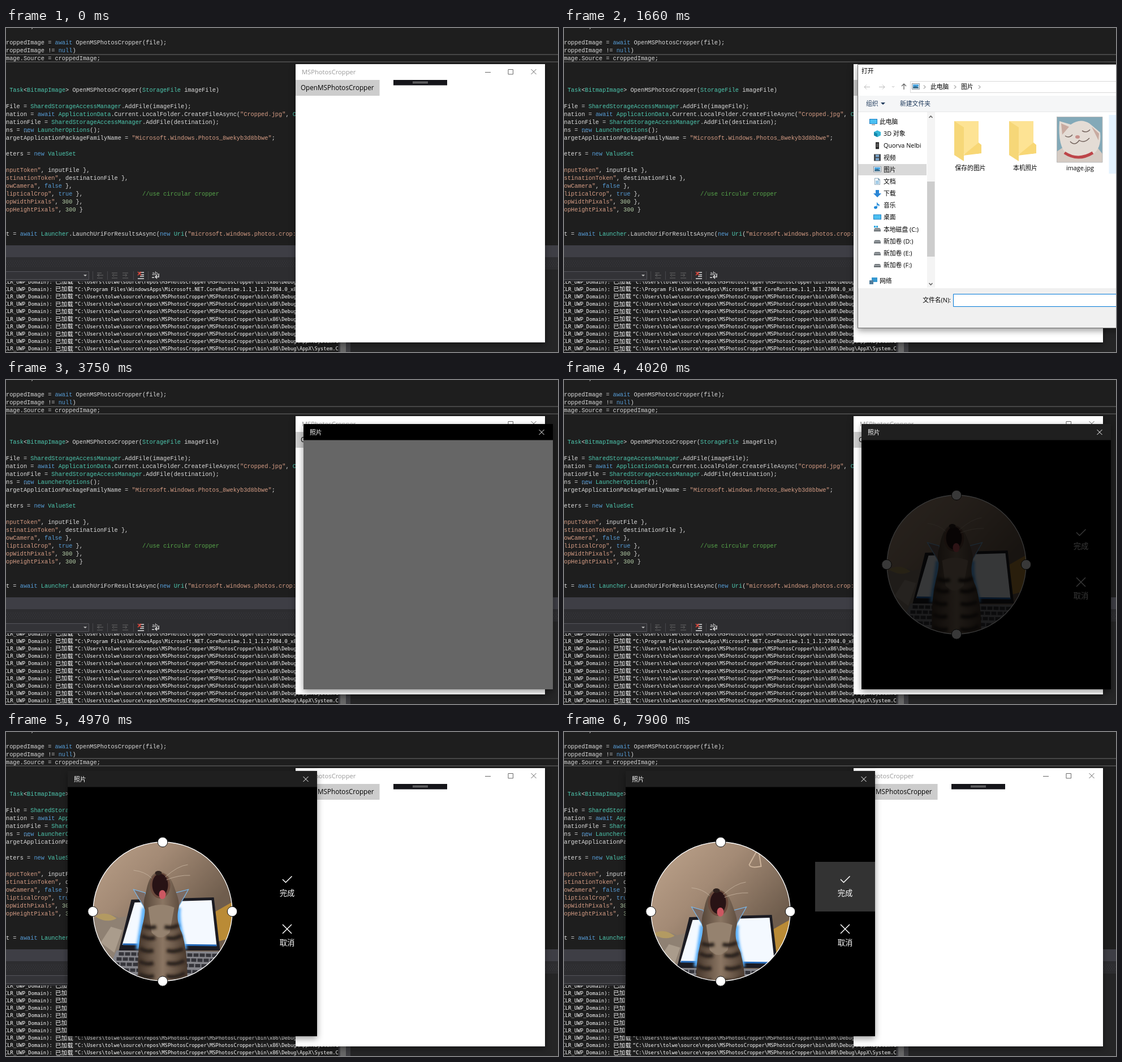
Write an HTML page that moves like this. It is 976x574 px and loops after 8000 ms.

```html
<!DOCTYPE html>
<html lang="zh-CN">
<head>
<meta charset="utf-8">
<style>
html, body { margin: 0; width: 100%; height: 100%; overflow: hidden; background: #1e1e1e; }
svg { display: block; }
text { font: 10.8px "Open Sans", "Noto Sans CJK SC", sans-serif; white-space: pre; }
.mono text { font: 10.3px "Liberation Mono", "Noto Sans CJK SC", monospace; }
.mono .log { font: 8.8px "DejaVu Sans Mono", "Noto Sans CJK SC", monospace; }
.mono .cjk { font-size: 10.6px; }
.mid { text-anchor: middle; }
.end { text-anchor: end; }
.line { fill: none; stroke: #666; }
.big { font-size: 13.3px; }
.shadow { filter: drop-shadow(0 4px 6px rgba(0,0,0,.4)); }
</style>
</head>
<body>
<svg id="stage" width="100%" height="100%" viewBox="0 0 976 574">
<defs>
  <linearGradient id="wall" x2=".8" y2="1">
    <stop offset="0" stop-color="#c0a68e"/><stop offset=".35" stop-color="#a38a75"/><stop offset=".7" stop-color="#6f5d4d"/>
  </linearGradient>
  <linearGradient id="fur">
    <stop offset="0" stop-color="#46372c"/><stop offset=".5" stop-color="#8b7663"/><stop offset="1" stop-color="#4a3a2e"/>
  </linearGradient>
  <filter id="blur" x="-20%" width="140%"><feGaussianBlur stdDeviation="2"/></filter>
  <clipPath id="round"><circle cx="168" cy="249" r="123"/></clipPath>
  <clipPath id="logClip"><path d="M0 449H588V574H0Z"/></clipPath>
  <symbol id="pic" viewBox="0 0 14 11"><path d="M.5.5h13v10H.5Z" fill="#fff" stroke="#7f8b96"/><path d="M2 2h10v4H2Z" fill="#4aa3df"/><path d="M2 6l5-1 5 2v2H2Z" fill="#356b8c"/></symbol>
  <symbol id="folder" viewBox="0 0 48 72"><path d="M0 0H43V58H0Z" fill="#fde394"/><path d="M43 38l5 4v15l-33 4Z" fill="#f8d775"/><path d="M0 0L17 11V71L0 60Z" fill="#f6d778"/></symbol>
  <symbol id="photo" viewBox="0 0 247 327" preserveAspectRatio="none">
    <path d="M0 0H247V327H0Z" fill="url(#wall)"/>
    <path d="M190 8V16L174 45Q176 52 195 48L190 16" class="line" style="stroke:#cdb49b" stroke-width="2"/>
    <path d="M0 172Q20 156 46 170L70 165 50 262H0Z" fill="#8f8173"/>
    <path d="M4 168q18-12 38 3q-16 10-38-3" fill="#b39a62"/>
    <path d="M14 214l18-28 20 6-14 40" fill="#aa9c8c"/>
    <path d="M212 162L247 142V205L222 212Z" fill="#ba8b36"/>
    <path d="M0 250L247 236V327H0Z" fill="#5a4231"/>
    <path d="M42 228L228 230 252 298 14 290Z" fill="#85858b"/>
    <path d="M46 234L228 237M42 243L232 246M38 252L236 256M33 262L240 267M28 273L244 279" class="line" style="stroke:#34343a" stroke-width="6" stroke-dasharray="9 2"/>
    <path d="M68 138L214 134 225 228 46 228Z" fill="#1b1b22"/>
    <path d="M74 143L210 139 219 220 52 218Z" fill="#f4f9ff"/>
    <path d="M53 217L219 219" stroke="#2469b8" stroke-width="3"/>
    <path d="M91 152Q88 178 80 226M152 152Q148 176 163 226" class="line" style="stroke:#5cb2ff" stroke-width="8" filter="url(#blur)"/>
    <path d="M92 154L72 120 93 126ZM150 154L169 120 146 126Z" fill="#7c6b63" stroke="#79b9ee" stroke-width="1.200"/>
    <path d="M116 88C105 90 98 104 95 120C91 136 88 146 92 156C92 168 88 182 85 196C80 222 78 260 82 308H166C169 262 166 222 157 196C150 180 148 168 152 152C154 140 148 128 144 116C138 98 128 88 116 88Z" fill="url(#fur)"/>
    <path d="M98 152Q120 142 144 152L136 196Q119 214 104 196Z" fill="#95826f"/>
    <g filter="url(#blur)">
      <path d="M90 184q10 6 22 2m15 0q12 4 25-3M86 202q14 8 24 3m20 0q14 5 27-4M83 224q12 8 24 4m24 0q14 4 29-3M82 247q14 8 25 3m24 0q15 5 31-4M82 270q14 7 26 3m22 0q15 5 33-5" class="line" style="stroke:#2c211b" stroke-width="7"/>
    </g>
    <ellipse cx="119" cy="113" rx="18" ry="23" fill="#6a4a3c"/>
    <ellipse cx="119" cy="112" rx="14" ry="20" fill="#281315"/>
    <ellipse cx="123" cy="129" rx="6" ry="8" fill="#cc5862"/>
    <ellipse cx="116" cy="91" rx="6" ry="4" fill="#2d201c"/>
    <path d="M128 98Q150 78 168 76M130 103Q152 94 172 95M104 100Q92 88 72 86" class="line" style="stroke:#c9b6a2" stroke-width=".8"/>
  </symbol>
  <symbol id="whiteCat" viewBox="0 0 81 81">
    <path d="M0 0H81V81H0Z" fill="#83a9b8"/>
    <path d="M0 81V62L18 50 70 52 81 66V81Z" fill="#d5cbc3"/>
    <path d="M5 8L25 14Q42 2 58 12L77 28Q80 58 62 68Q40 76 18 66Q2 54 5 8Z" fill="#e4dcd5"/>
    <path d="M8 12L22 18 10 32ZM62 18L75 30 74 42Z" fill="#c8aaa0"/>
    <path d="M14 64Q38 80 64 64" class="line" style="stroke:#bd4549" stroke-width="5"/>
    <path d="M15 34q7 5 13-2M45 25q8 5 14-2M24 44q8 9 16-2q9 6 18-4" class="line" style="stroke:#75655f" stroke-width="1.5"/>
    <ellipse cx="37" cy="36" rx="4" ry="3" fill="#c78f8a"/>
  </symbol>
</defs>

<!-- editor -->
<g class="mono">
  <path d="M0 0H976V574H0Z" fill="#1e1e1e"/>
  <path d="M0 47H976M0 60H976" stroke="#464646" stroke-width="2"/>
  <g id="code"></g>
  <path d="M32 184h11" stroke="#aaa" stroke-dasharray="2 2"/>
  <path d="M0 385H976V450H0Z" fill="#2d2d30"/>
  <path d="M0 385H976V406H0Z" fill="#3e3e45"/>
  <path d="M0 413H976M0 419H976" stroke="#414147" stroke-dasharray="1 3"/>
  <path d="M2 416H976M2 422H976" stroke="#414147" stroke-dasharray="1 3"/>
  <path d="M-1 431.500H146.500V445.500H-1Z" fill="#333337" stroke="#55555a"/>
  <path d="M137 437h6l-3 3Z" fill="#bbb"/>
  <path d="M153.500 431v15M179.500 431v15M225.500 431v15M251.500 431v15" stroke="#46464a"/>
  <path d="M161 434h8m-6 4h9m-11 5h10m-6-7l-4 2 4 2M187 434h10m-6 4h6m-10 5h10m-6-7l-3 2 3 2M206 434h10m-10 4h6m-6 5h10m-5-7l3 2-3 2" class="line"/>
  <path d="M236 433h8m-5 4h5m-7 3h7m-11 4h11" stroke="#ddd" stroke-width="1.5"/>
  <path d="M233 432l6 6m0-6l-6 6" stroke="#e0453a" stroke-width="1.700"/>
  <text x="258" y="438" fill="#ddd" class="log">ab</text>
  <path d="M258 442h4m8-7v6h-6m3-3l-3 3 3 3" class="line" style="stroke:#ddd" stroke-width="1.500"/>
  <g id="log" clip-path="url(#logClip)" fill="#fff"></g>
  <path d="M588 450H609V574H588Z" fill="#3e3e42"/><path d="M591 450H601V574H591Z" fill="#686868"/>
  <path d="M609 428H976V574H609Z" fill="#252526"/>
</g>

<!-- app window -->
<g>
  <path class="shadow" d="M512 64H953V557H512Z" fill="#fff"/>
  <text id="appTitle" x="523" y="81.500" style="font-size:11.2px">MSPhotosCropper</text>
  <path d="M847 78.500h10M888 73.500h8.500v8.500h-8.500ZM928.500 73l9 9m0-9l-9 9" class="line"/>
  <rect id="btn" x="513" y="93" width="146.500" height="26" stroke-width="2"/>
  <text x="521" y="110" style="font-size:11.7px">OpenMSPhotosCropper</text>
  <path d="M685 92H780V101.500H685Z" fill="#15151a"/>
  <path d="M719 95.500h27m-27 2h27" stroke="#999"/>
</g>

<!-- file dialog -->
<g id="dialog">
  <path class="shadow" d="M.5.5H831.500V467.500H.5Z" fill="#fff" stroke="#6b6b6b"/>
  <text x="7" y="16">打开</text>
  <path d="M814 7l9 9m0-9l-9 9" class="line" style="stroke:#111"/>
  <path d="M22 40.500h-10m4-4l-4 4 4 4M38 40.500h10m-4-4l4 4-4 4M61 39l2 2 2-2" class="line" style="stroke:#bbb"/>
  <path d="M82 45v-10m-4 4l4-4 4 4" class="line" stroke-width="1.300"/>
  <path d="M93.500 30.500h540v20h-540ZM614.500 30.500v20M643.500 30.500h178v20h-178Z" class="line" style="stroke:#d9d9d9"/>
  <path d="M602 39l4 4 4-4M627 38a4 4 0 1 0 0 4m0-7v3h-3" class="line" stroke-width="1.300"/>
  <circle cx="810" cy="38.500" r="3.200" class="line"/><path d="M808 41l-4 4" class="line" stroke-width="1.500"/>
  <text x="652" y="44" fill="#6d6d6d">搜索"图片"</text>
  <path d="M1 56H831V84H1Z" fill="#f5f6f7"/><path d="M1 84.500H831" stroke="#e6e7e8"/>
  <g fill="#1e395b"><text x="15" y="74">组织</text><text x="75" y="74">新建文件夹</text><path d="M41 68h8l-4 4ZM747 68h7l-3.500 4Z"/></g>
  <use href="#pic" x="725" y="65" width="13" height="10"/>
  <path d="M773.500 65.500h13v9.500h-13Z" fill="#fff" stroke="#2c6ba0"/><path d="M781 66h5v9h-5Z" fill="#6fb2e4"/>
  <circle cx="811.500" cy="70" r="7" fill="#0a64ad"/><text x="811.500" y="74" class="mid" fill="#fff" font-weight="700">?</text>
  <g id="content">
    <use href="#pic" x="96" y="34" width="14" height="11"/>
    <path d="M117 37.500l3 3-3 3M171 37.500l3 3-3 3M214 37.500l3 3-3 3" class="line"/>
    <text x="129" y="44">此电脑</text><text x="183" y="44">图片</text>
    <path d="M1 177H122V197H1Z" fill="#d9d9d9"/>
    <g id="side"></g>
    <path d="M123 85H137V396H123Z" fill="#f4f4f4"/><path d="M123 208H136.500V341H123Z" fill="#cdcdcd"/>
    <path d="M126.500 95l3-3 3 3M126.500 388l3 3 3-3" class="line" stroke-width="1.600"/>
    <g id="files">
      <rect id="hover" y="90" width="92.500" height="104"/>
      <use href="#folder" x="171" y="101" width="48" height="72"/>
      <use href="#folder" x="268" y="101" width="48" height="72"/>
      <use href="#whiteCat" x="352" y="93" width="81" height="81"/>
      <use href="#photo" x="458.500" y="93.500" width="60" height="80"/>
      <path d="M352.500 93.500h80.500v80.500h-80.500ZM458.500 93.500h60v80.500h-60Z" class="line" style="stroke:#bbb"/>
      <g class="mid"><text x="199.500" y="188">保存的图片</text><text x="296.500" y="188">本机照片</text><text x="393.500" y="188">image.jpg</text><text x="490" y="188">test.jpg</text></g>
    </g>
  </g>
  <path d="M1 397H831V467H1Z" fill="#f0f0f0"/>
  <text x="165" y="422" class="end">文件名(N):</text>
  <path d="M169.500 407.500h471v22h-471Z" fill="#fff" stroke="#0078d7"/>
  <path id="caret" d="M173.500 411v15" stroke="#000"/>
  <path d="M651.500 407.500h165v21h-165ZM740.500 435.500h75v21h-75Z" fill="#e1e1e1" stroke="#adadad"/>
  <path d="M653 436h74v20h-74Z" fill="#e1e1e1" stroke="#0078d7" stroke-width="2"/>
  <path d="M629 417l3.500 3.500 3.500-3.500M805 417l3.500 3.500 3.500-3.500" class="line"/>
  <text x="654" y="422">所有文件 (*.png;*.jpg;*.jpeg)</text>
  <g class="mid"><text x="690" y="450">打开(O)</text><text x="778" y="450">取消</text></g>
  <path d="M828 459v6m-3-3v3m-3-1v1" stroke="#aaa" stroke-dasharray="2 1" stroke-width="2"/>
</g>

<!-- cropper window -->
<g id="crop">
  <rect id="cropBody" class="shadow" width="441" height="470"/>
  <rect id="cropBar" width="441" height="28.500"/>
  <text x="11" y="18.500" fill="#fff">照片</text>
  <path d="M416.500 10l9 9m0-9l-9 9" class="line" style="stroke:#fff"/>
  <g id="tools">
    <rect id="done" x="335" y="161" width="106" height="88"/>
    <g clip-path="url(#round)">
      <use id="shot" href="#photo" x="44.500" width="247" height="327"/>
      <path id="grid" d="M126.500 120V380M208.500 120V380M40 207.500H300M40 289.500H300" stroke="#222" stroke-opacity=".75"/>
    </g>
    <circle cx="168" cy="249" r="123" class="line" style="stroke:#fff" stroke-width="1.300"/>
    <g fill="#fff" stroke="#111"><circle cx="168" cy="126" r="8.700"/><circle cx="168" cy="372.500" r="8.700"/><circle cx="44.500" cy="249" r="8.700"/><circle cx="291" cy="249" r="8.700"/></g>
    <path d="M380 192l5.500 5.500 11-11M380 272l16 16m0-16l-16 16" class="line" style="stroke:#fff" stroke-width="1.500"/>
    <g class="mid" fill="#fff"><text x="388" y="220.500" class="big">完成</text><text x="388" y="308.500" class="big">取消</text></g>
  </g>
</g>
</svg>
<script>
const $ = id => document.getElementById(id);
const set = (id, attrs) => { for (const k in attrs) $(id).setAttribute(k, attrs[k]); };

// Editor text: blank lines keep the row rhythm
const source = `!= null)

roppedImage = await OpenMSPhotosCropper(file);
roppedImage != null)
mage.Source = croppedImage;



 Task&lt;BitmapImage&gt; OpenMSPhotosCropper(StorageFile imageFile)

File = SharedStorageAccessManager.AddFile(imageFile);
nation = await ApplicationData.Current.LocalFolder.CreateFileAsync("Cropped.jpg", CreationCollisionOption.ReplaceExisting);
nationFile = SharedStorageAccessManager.AddFile(destination);
ns = new LauncherOptions();
argetApplicationPackageFamilyName = "Microsoft.Windows.Photos_8wekyb3d8bbwe";

eters = new ValueSet

nputToken", inputFile },
stinationToken", destinationFile },
owCamera", false },
${'lipticalCrop", true },'.padEnd(39)}//use circular cropper
opWidthPixals", 300 },
opHeightPixals", 300 }


t = await Launcher.LaunchUriForResultsAsync(new Uri("microsoft.windows.photos.crop:"), options, parameters);`;
const rules = [
  ['#d69d85', '^\\w+"|"[^"]*"'],
  ['#57a64a', '//.*'],
  ['#569cd6', '\\b(?:await|null|new|false|true)\\b'],
  ['#4ec9b0', '\\b(?:Task|BitmapImage|StorageFile|SharedStorageAccessManager|ApplicationData|LauncherOptions|Launcher|ValueSet|Uri|CreationCollisionOption)\\b'],
  ['#b5cea8', '\\b\\d+\\b']
];
const tokens = new RegExp(rules.map(r => `(${r[1]})`).join('|'), 'g');
const paint = line => line.replace(tokens, (m, ...groups) =>
  `<tspan fill="${rules[groups.findIndex(g => g !== undefined)][0]}">${m}</tspan>`);
$('code').innerHTML = source.split('\n').map((line, i) =>
  `<text y="${0.4 + i * 14.125}" fill="#dcdcdc">${paint(line)}</text>`).join('');

const appPath = 'C:\\Users\\tolwe\\source\\repos\\MSPhotosCropper\\MSPhotosCropper\\bin\\x86\\Debug\\AppX\\System.Core.dll';
const runtime = 'C:\\Program Files\\WindowsApps\\Microsoft.NET.CoreRuntime.1.1_1.1.27004.0_x86__8wekyb3d8bbwe\\clrcompression.dll';
$('log').innerHTML = Array.from({ length: 10 }, (_, i) => {
  const y = 452.500 + i * 13.22;
  return `<text class="log" x="-3" y="${y}">CLR_UWP_Domain): </text><text class="cjk" x="87" y="${y + .5}">已加载</text>` +
    `<text class="log" x="121.500" y="${y}">“</text><text class="log" x="127" y="${y}">${i == 1 ? runtime : appPath}</text>`;
}).join('');

// Sidebar: label and a small 14 by 12 icon
const shape = (d, fill) => `<path d="${d}" fill="${fill}"/>`;
const screen = shape('M0 1h14v9H0Z', '#1b7fc4') + shape('M1 2h12v7H1Z', '#4cc0f2');
const disk = shape('M1 6l2-2h8l2 2v4H1Z', '#6f7579') + shape('M1 6h12v1H1Z', '#b9bfc3');
const items = [
  ['此电脑', screen + shape('M4 11h6v1H4Z', '#666')],
  ['3D 对象', shape('M1 3l6-3 6 3v6l-6 3-6-3Z', '#36b5d6') + shape('M1 3l6 3v6l-6-3Z', '#1587aa')],
  ['Quorva Nelbi', shape('M4 0h6v12H4Z', '#222') + shape('M5 2h4v7H5Z', '#555')],
  ['视频', shape('M1 0h12v12H1Z', '#44484c') + shape('M4 1h6v4H4ZM4 7h6v4H4Z', '#7ba7cf')],
  ['图片', '<use href="#pic" width="14" height="11"/>'],
  ['文档', shape('M2 0h7l3 3v9H2Z', '#8ba6b8') + shape('M3 1h5v3h3v7H3Z', '#fff') + shape('M4 5h6v1H4ZM4 7h6v1H4ZM4 9h6v1H4Z', '#4b9ad0')],
  ['下载', shape('M4 0h6v6h4l-7 7-7-7h4Z', '#2a86d6')],
  ['音乐', shape('M6 0q1 3 5 5-1 3-2 3 1-2-2-3v5a3 2.500 0 1 1-1-2Z', '#1e88d8')],
  ['桌面', screen],
  ['本地磁盘 (C:)', disk + shape('M1 0h3v3H1ZM5 0h3v3H5Z', '#19a0e0')],
  ['新加卷 (D:)', disk], ['新加卷 (E:)', disk], ['新加卷 (F:)', disk],
  ['网络', shape('M4 0h10v8H4Z', '#3597cf') + shape('M0 5h7v7H0Z', '#527d9c')]
];
$('side').innerHTML = items.map(([label, icon], i) => {
  const root = i == 0 || i == items.length - 1;
  const y = i == items.length - 1 ? 384 : 102 + i * 21.17;
  return `<g transform="translate(${root ? 21 : 28} ${y - 6})">${icon}</g><text x="${root ? 39 : 46}" y="${y + 4}">${label}</text>`;
}).join('');

const ramp = (t, a, b) => Math.min(1, Math.max(0, (t - a) / (b - a)));
const smooth = u => u * u * (3 - 2 * u);
const within = (t, a, b) => t >= a && t < b;
const place = (x, y, w, h, s) => `translate(${x + w / 2 * (1 - s)} ${y + h / 2 * (1 - s)}) scale(${s})`;

function draw(t) {
  const pressed = within(t, 490, 600), over = within(t, 260, 900);
  set('btn', { fill: pressed ? '#999' : '#ccc', stroke: pressed ? '#999' : over ? '#7a7a7a' : '#ccc' });
  set('appTitle', { fill: within(t, 490, 1290) || within(t, 3300, 3700) ? '#000' : '#999' });

  const open = smooth(ramp(t, 700, 950)), close = ramp(t, 3080, 3230);
  const drag = smooth(ramp(t, 2410, 2660));
  set('dialog', {
    opacity: open * (1 - close),
    transform: place(519 - 434 * drag, 64 + 16 * drag, 832, 468, .94 + .06 * open - .06 * close)
  });
  set('content', { opacity: +(t >= 1290) });
  set('files', { opacity: +(t >= 1400) });
  const onCat = within(t, 1780, 1920), onTest = within(t, 1600, 1780) || t >= 2850;
  set('hover', { x: onCat ? 348 : 444.500, fill: t >= 3080 ? '#cce8ff' : '#e5f3ff', opacity: +(onCat || onTest) });
  set('caret', { opacity: +within(t, 2140, 2660) });

  const rise = ramp(t, 3680, 3750);
  const move = 1 - (1 - ramp(t, 4610, 4970)) ** 1.88;
  set('crop', {
    opacity: rise,
    transform: place(526 - 417 * move, 78 + 10.62 * move - 19.62 * move * move, 441, 470, .9 + .1 * rise)
  });
  const grey = Math.round(102 * (1 - ramp(t, 3790, 3920)));
  set('cropBody', { fill: `rgb(${grey},${grey},${grey})` });
  set('cropBar', { fill: t < 3800 ? '#000' : '#1f1f1f' });
  set('tools', { opacity: ramp(t, 3950, 4270) });
  set('shot', { y: 90 + 31 * smooth(ramp(t, 6720, 6940)) });
  set('grid', { opacity: +(within(t, 5940, 6180) || within(t, 6720, 7400)) });
  set('done', { fill: t >= 7900 ? '#333' : '#1a1a1a', opacity: +(t >= 7490) });
}

const start = performance.now();
function frame() {
  draw((performance.now() - start) % 8000);
  requestAnimationFrame(frame);
}
frame();
</script>
</body>
</html>
```
